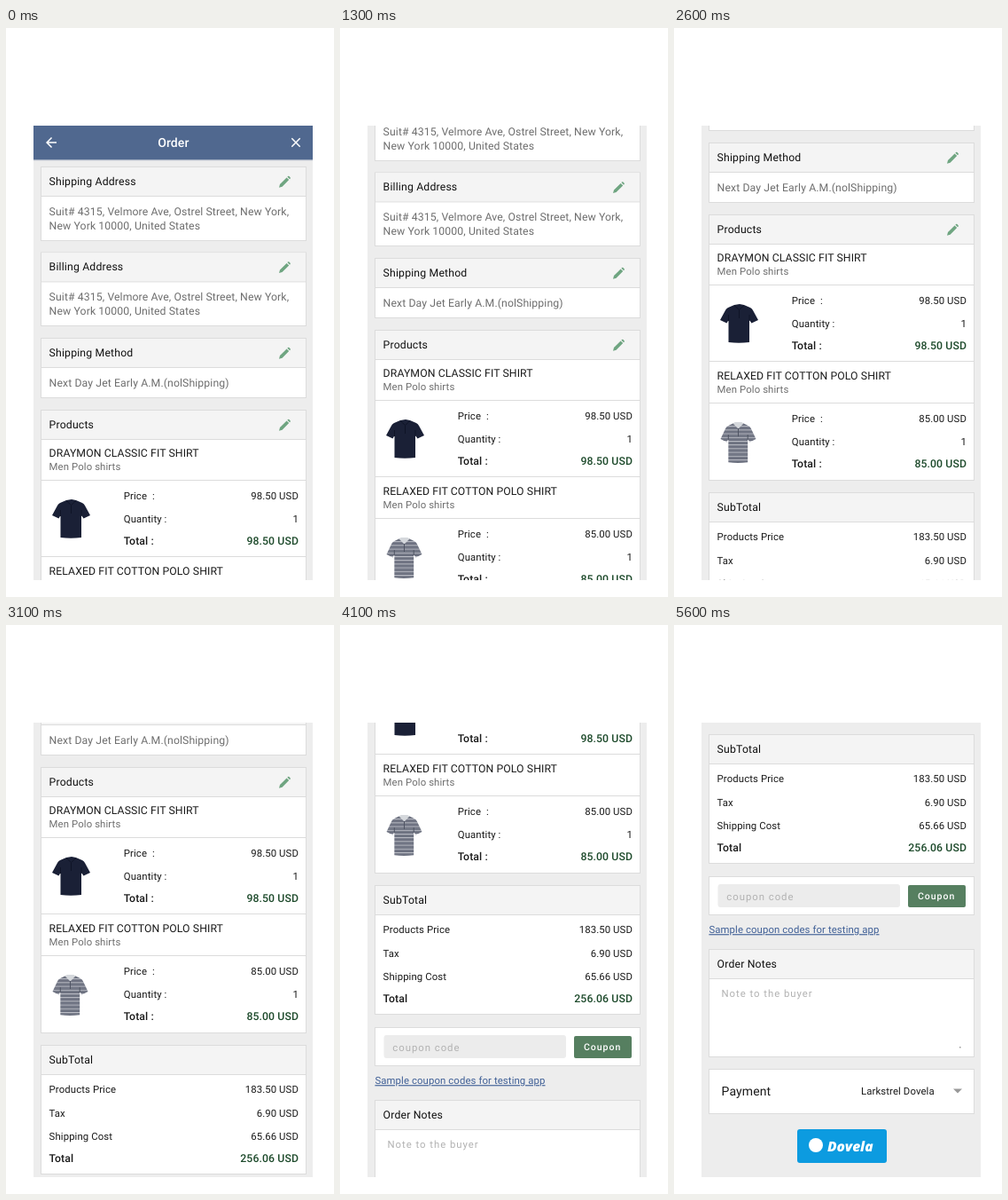
An HTML page that plays this animation: 370x641 px, repeating every 6100 ms.

```html
<!DOCTYPE html>
<html lang="en">
<head>
<meta charset="utf-8">
<title>Order</title>
<style>
  html, body { margin: 0; width: 100%; height: 100%; overflow: hidden; background: #fff; }
  svg { display: block; }
  text { font: 12.25px Roboto, sans-serif; letter-spacing: .1px; fill: #1a1a1a; white-space: pre; text-rendering: geometricPrecision; }
  .title { letter-spacing: .17px; fill: #111; }
  .small { font-size: 11.375px; }
  .large { font-size: 14px; }
  .grey { fill: #6e6e6e; }
  .bold { font-weight: 500; }
  .sum { font-weight: 500; fill: #1d4a2b; }
  .hint { font-size: 11.375px; letter-spacing: .97px; fill: #b2b2b2; }
  .button { font-size: 10.5px; font-weight: 500; letter-spacing: .97px; fill: #fff; }
  .link { font-size: 11.375px; fill: #3f5f96; text-decoration: underline; }
  .white { fill: #fff; }
  .brand { font: italic 800 15.5px "Open Sans", sans-serif; letter-spacing: 0; fill: #fff; }
</style>
</head>
<body>
<svg width="370" height="641" viewBox="0 0 370 641">
  <defs>
    <clipPath id="view"><rect x="31" y="110" width="315" height="512"/></clipPath>
    <pattern id="stripes" width="6" height="4" patternUnits="userSpaceOnUse">
      <rect width="6" height="4" fill="#626777"/>
      <rect width="6" height="1" fill="#c4c6cd"/>
      <rect y="2.2" width="6" height=".6" fill="#8b8f9b"/>
    </pattern>
    <path id="pencil" d="M0 13L1 9.400L8.600 1.800L11.200 4.400L3.600 12ZM9.400 1L10 .4Q10.700-.2 11.400.4L12.600 1.600Q13.200 2.300 12.600 3L12 3.600Z"/>
    <path id="shirt" d="M16 1L22 0L27 1L34 4Q36 5 37 7L43 18L35.500 21.500L33 18V43Q21 44.500 9.500 43V18L7.500 21.500L0 18L6 7Q7 5 9 4Z"/>
  </defs>
  <g clip-path="url(#view)">
    <rect x="31" y="110" width="315" height="512" fill="#ededed"/>
    <g id="page"></g>
  </g>
</svg>
<script>
const EDGE = '#dcdcdc', LEFT = 48.6, RIGHT = 330;
const parts = [];
const add = (...items) => parts.push(...items);

const text = (x, y, s, cls = '', anchor = 'start') =>
  `<text x="${x}" y="${y}" class="${cls}" text-anchor="${anchor}">${s}</text>`;
const rect = (x, y, w, h, fill, r = 0) =>
  `<rect x="${x}" y="${y}" width="${w}" height="${h}" rx="${r}" fill="${fill}"/>`;
const rule = y => rect(39, y, 300, 1, EDGE);
const use = (id, x, y, fill, scale = '1') =>
  `<use href="#${id}" transform="translate(${x} ${y}) scale(${scale})" fill="${fill}"/>`;

function card(top, bottom, title, editable) {
  add(rect(39, top, 300, bottom - top, EDGE),
      rect(40, top + 1, 298, bottom - top - 2, '#fff'));
  if (!title) return;
  add(rect(40, top + 1, 298, 32, '#f4f4f4'), rule(top + 33), text(LEFT, top + 21, title, 'title'));
  if (editable) add(use('pencil', 308, top + 10.7, '#6fa581'));
}

function row(x, y, label, value, total) {
  add(text(x, y, label, total ? 'bold' : 'small'),
      text(RIGHT, y, value, total ? 'sum' : 'small', 'end'));
}

function product(y, name, price) {
  add(text(LEFT, y, name), text(LEFT, y + 15, 'Men Polo shirts', 'small grey'), rule(y + 26));
  row(132.8, y + 48, 'Price\u00a0 :', price);
  row(132.8, y + 74, 'Quantity :', '1');
  row(132.8, y + 99, 'Total :', price, true);
}

// Title bar
add(rect(31, 149, 315, 1, '#dcdee2'), rect(31, 110, 315, 38.5, '#50688f'),
    '<path transform="translate(42 120) scale(.75)" fill="#fff" d="M20 11H7.830l5.590-5.590L12 4l-8 8 8 8 1.410-1.410L7.830 13H20z"/>',
    '<path d="M322.300 124.300l9.400 9.400m0-9.400l-9.400 9.400" stroke="#fff" stroke-width="1.500"/>',
    text(188.8, 134, 'Order', 'large bold white', 'middle'));

for (const [top, bottom, title] of [[156, 240, 'Shipping Address'], [252.4, 336, 'Billing Address']]) {
  card(top, bottom, title, true);
  add(text(LEFT, top + 54.7, 'Suit# 4315, Velmore Ave, Ostrel Street, New York,', 'grey'),
      text(LEFT, top + 70.7, 'New York 10000, United States', 'grey'));
}

card(349, 417, 'Shipping Method', true);
add(text(LEFT, 403.7, 'Next Day Jet Early A.M.(nolShipping)', 'grey'));

card(430, 730, 'Products', true);
product(483, 'DRAYMON CLASSIC FIT SHIRT', '98.50 USD');
add(rule(595));
product(616, 'RELAXED FIT COTTON POLO SHIRT', '85.00 USD');
add(use('shirt', 52, 531, '#1a2036'),
    '<path d="M68 532.500l5.500 5 5.500-5M73.500 538v9M61.500 550v-7M85 550v-7" fill="none" stroke="#0f1426"/>',
    use('shirt', 52.5, 664, 'url(#stripes)', '.93 1.05'),
    '<path d="M66.500 665.500l6 6 6-6-2.500-1.500h-7z" fill="#d5d8dc"/>',
    '<path d="M72.500 671v9M61.300 684v-6M83.200 684v-6" stroke="#4f5463" fill="none"/>');

card(743, 889, 'SubTotal');
row(LEFT, 797.3, 'Products Price', '183.50 USD');
row(LEFT, 823.5, 'Tax', '6.90 USD');
row(LEFT, 849.8, 'Shipping Cost', '65.66 USD');
row(LEFT, 875.3, 'Total', '256.06 USD', true);

card(903, 947);
add(rect(49.5, 912, 205.5, 26, '#ececec', 3), text(59.3, 929.6, 'coupon code', 'hint'),
    rect(264, 913, 65, 25, '#567f60', 2), text(275, 929, 'Coupon', 'button'),
    text(39.4, 967.2, 'Sample coupon codes for testing app', 'link'));

card(985, 1107, 'Order Notes');
add(text(53.5, 1039.2, 'Note to the buyer', 'hint'), rect(322, 1095, 1.5, 1.5, '#999'));

card(1120, 1171);
add(text(53.6, 1149.6, 'Payment', 'large'), text(211, 1149.2, 'Larkstrel Dovela', 'small'),
    '<path d="M315 1142.500h10l-5 5z" fill="#999"/>');

add(rect(139, 1188, 101, 38, '#0c9be0', 3),
    '<circle cx="160" cy="1206" r="8" fill="#fff"/>',
    text(173, 1212.6, 'Dovela', 'brand'));

const page = document.getElementById('page');
page.innerHTML = parts.join('');

// Scroll in 100 ms ticks: [time, offset, ticks until the next entry]
const LOOP = 6100;
const scroll = [[0, 0, 1], [400, 0, 29], [3300, 290, 10], [4300, 490, 13], [5600, 620, 1], [LOOP, 620, 1]];
page.animate(scroll.map(([time, y, ticks]) => ({
  offset: time / LOOP,
  transform: `translate(0px, ${-y}px)`,
  easing: `steps(${ticks}, end)`
})), { duration: LOOP, iterations: Infinity, delay: -2 });
</script>
</body>
</html>
```
